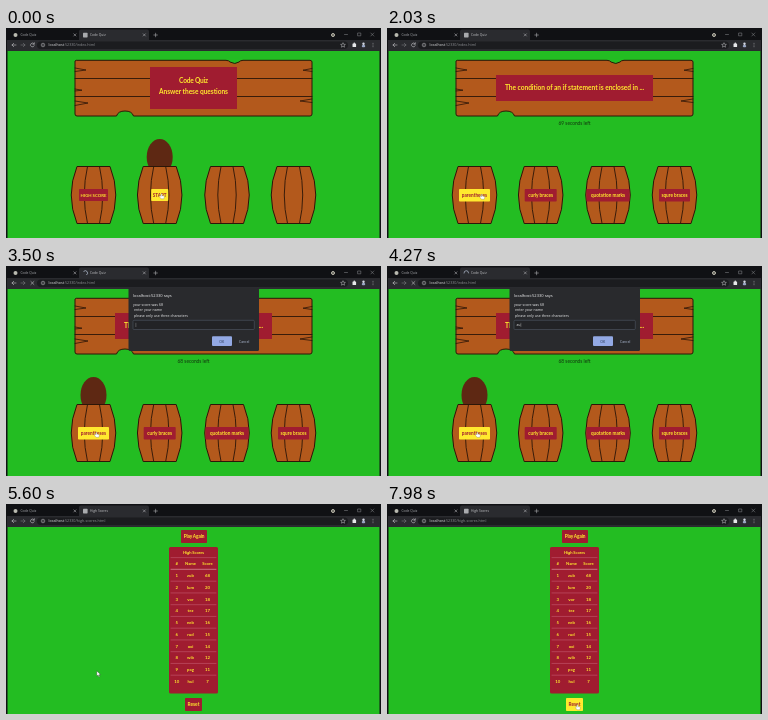
Animation, 375 px wide and 210 px high, one loop 8 s. Source, as an HTML page:

```html
<!DOCTYPE html>
<html lang="en">
<head>
<meta charset="utf-8">
<title>Code Quiz</title>
<style>
html, body { margin: 0; width: 100%; height: 100%; overflow: hidden; background: #101114; }
svg { display: block; width: 100vw; height: 100vh; }
text { font-family: "Open Sans", sans-serif; }
.game { font-family: Lato, sans-serif; font-weight: 700; }
</style>
</head>
<body>
<svg id="stage" viewBox="0 0 375 210"></svg>
<script>
const LOOP = 8000;
const GREEN = '#23bd22', WOOD = '#b3591c', RED = '#a01c30', YELLOW = '#ffe92e';
const INK = '#2c1608', PALE = '#c4c5c8', DIM = '#8d8f93';
const stage = document.getElementById('stage');

function el(parent, tag, attrs = {}, content) {
  const node = document.createElementNS('http://www.w3.org/2000/svg', tag);
  set(node, attrs);
  if (content !== undefined) node.textContent = content;
  parent.appendChild(node);
  return node;
}
function set(node, attrs) {
  for (const key in attrs) node.setAttribute(key, attrs[key]);
}
const group = parent => el(parent, 'g');
const rect = (p, x, y, width, height, fill, rx = 0) =>
  el(p, 'rect', { x, y, width, height, fill, rx });
const circle = (p, cx, cy, r, fill) => el(p, 'circle', { cx, cy, r, fill });
const line = (p, d, stroke = PALE, width = 0.6) =>
  el(p, 'path', { d, stroke, fill: 'none', 'stroke-width': width, 'stroke-linecap': 'round' });
const label = (p, x, y, size, fill, str) =>
  el(p, 'text', { x, y, 'font-size': size, fill }, str);
const gameText = (p, x, y, size, str, fill = YELLOW, spacing = 0) =>
  el(p, 'text', { x, y, 'font-size': size, fill, class: 'game', 'text-anchor': 'middle', 'letter-spacing': spacing }, str);
const show = (node, on) => node.setAttribute('display', on ? 'inline' : 'none');
const progress = (t, a, b) => Math.min(1, Math.max(0, (t - a) / (b - a)));
const ease = k => k * k * (3 - 2 * k);

// Button whose colours swap on hover
function button(p, cx, y, w, h, size, str, spacing = 0) {
  const box = rect(p, cx - w / 2, y, w, h, RED, 0.8);
  const txt = gameText(p, cx, y + h / 2 + size * 0.35, size, str, YELLOW, spacing);
  return hot => {
    set(box, { fill: hot ? YELLOW : RED });
    set(txt, { fill: hot ? RED : YELLOW });
  };
}

function buildPlank(p) {
  el(p, 'path', {
    d: 'M69 33Q70 32 72 32.3H220Q223 32.5 224 34Q229 37 233 34Q234 32.5 237 32.3H304Q306 32.5 306 34V86Q306 88 304 88' +
       'H127.5Q126 83 119 83Q112 83 110.5 88H71Q69 88 69 86Z',
    fill: WOOD, stroke: INK, 'stroke-width': 1, 'stroke-linejoin': 'round'
  });
  line(p, 'M69 50.5H306M69 68.5H306', INK, 0.9);
  // Thin splits along both ends
  line(p, 'M69 40L80 42L69 43.5M69 61L76 62.2L69 63M69 73L82 75L69 77.5' +
          'M306 40.5L297 42.2L306 43.5M306 71L294 73L306 74.5', INK, 0.8);
}

const BARRELS = [87.5, 153.7, 221, 287.5];
function buildBarrel(p, cx) {
  const g = el(p, 'g', { transform: `translate(${cx} 0)` });
  el(g, 'path', {
    d: 'M-16.5 138.5H16.5Q28 167 16.5 195.5H-16.5Q-28 167 -16.5 138.5Z',
    fill: WOOD, stroke: INK, 'stroke-width': 1, 'stroke-linejoin': 'round'
  });
  line(g, 'M-6 138.5Q-12.5 167 -6 195.5M6 138.5Q12.5 167 6 195.5', INK, 0.9);
}

function buildChrome(p) {
  rect(p, 0, 0, 375, 13, '#101114');
  rect(p, 1, 12, 373, 11, '#2a2b2f');
  rect(p, 73, 1.5, 70, 13, '#2a2b2f', 2);
  rect(p, 31, 13.5, 311, 7.5, '#1b1c1f', 3.7);
  circle(p, 9.5, 7, 2, '#b9bab0');
  label(p, 14.5, 8.2, 3.3, '#aeb0b4', 'Code Quiz');
  line(p, 'M67.8 5.8l2.2 2.2m0-2.2l-2.2 2.2M137.2 5.8l2.2 2.2m0-2.2l-2.2 2.2M147.8 7h3.6m-1.8-1.8v3.6', PALE, 0.5);
  set(circle(p, 327, 7, 1.5, '#55544e'), { stroke: '#cfccbd', 'stroke-width': 0.9 });
  line(p, 'M338.5 6.5h3M364.8 5l3 3m0-3l-3 3M352 5h2.8v2.8h-2.8z', DIM, 0.5);
  line(p, 'M10 17H6m1.7-1.7L6 17l1.7 1.7', PALE);
  line(p, 'M15 17h4m-1.7-1.7L19 17l-1.7 1.7', '#77797d');
  el(p, 'path', {
    d: 'M337 14.7l.7 1.6 1.7.1-1.3 1.1.4 1.7-1.5-.9-1.5.9.4-1.7-1.3-1.1 1.7-.1z',
    fill: 'none', stroke: PALE, 'stroke-width': 0.5
  });
  rect(p, 346.5, 15.4, 3.6, 3.6, '#e6e7e9', 0.6);
  circle(p, 348.3, 15.2, 0.8, '#e6e7e9');
  circle(p, 357.5, 15.8, 1.2, '#d3d7e2');
  rect(p, 355.8, 17, 3.4, 2.3, '#9aa6c4', 1);
  for (const y of [15.2, 17, 18.8]) circle(p, 367, y, 0.45, PALE);
  set(circle(p, 37, 17, 1.8, 'none'), { stroke: PALE, 'stroke-width': 0.5 });
  line(p, 'M37 16.9v.9M37 16v.1', PALE, 0.5);
}

// Game page
rect(stage, 1.5, 22, 372, 188, GREEN);
const game = group(stage);
buildPlank(game);
const ape = el(game, 'ellipse', { cy: 129, rx: 13, ry: 18, fill: '#5e2813' });
BARRELS.forEach(cx => buildBarrel(game, cx));

const intro = group(game);
rect(intro, 144, 39, 87, 42, RED);
gameText(intro, 187.5, 55.2, 6.6, 'Code Quiz', YELLOW, -0.2);
gameText(intro, 187.5, 66, 6.6, 'Answer these questions', YELLOW, -0.05);
button(intro, BARRELS[0], 161, 29, 12, 4.3, 'HIGH SCORE');
button(intro, BARRELS[1], 161, 17, 12, 4.6, 'START')(true);

const quiz = group(game);
rect(quiz, 109, 47, 157, 26, RED);
gameText(quiz, 187.5, 62.3, 6.65, 'The condition of an if statement is enclosed in ...', YELLOW, -0.05);
const clock = el(quiz, 'text', { x: 187.5, y: 96.8, 'font-size': 4.8, fill: '#12300f', 'text-anchor': 'middle' });
clock.style.fontFamily = 'Lato, sans-serif';
const answers = [['parentheses', 31], ['curly braces', 32], ['quotation marks', 43], ['squre braces', 31]]
  .map(([str, w], i) => button(quiz, BARRELS[i], 161, w, 12.5, 4.7, str));

// High score page
const NAME = 'zub';
const SCORES = [[NAME, 68], ['lum', 20], ['vor', 18], ['tez', 17], ['neb', 16],
  ['rud', 15], ['oxi', 14], ['wib', 12], ['pag', 11], ['hul', 7]];
const board = group(stage);
button(board, 188, 26, 26, 13, 4.8, 'Play Again', -0.15);
rect(board, 163, 43, 49, 146.5, RED, 1.5);
gameText(board, 187.5, 50, 4.1, 'High Scores', YELLOW, -0.05);
const COLS = [170.8, 184.5, 201.5];
function row(y, cells, size) {
  cells.forEach((c, i) => gameText(board, COLS[i], y, size, c));
}
line(board, 'M165 53.6H210', '#c9657a', 0.5);
row(60.8, ['#', 'Name', 'Score'], 4.2);
line(board, 'M165 65.3H210', '#d98795', 0.8);
SCORES.forEach(([name, score], i) => {
  const y = 73 + i * 11.75;
  row(y, [i + 1, name, score], 4.3);
  if (i < 9) line(board, `M165 ${y + 4.2}H210`, '#c9657a', 0.5);
});
const reset = button(board, 187.5, 194, 17, 13, 4.8, 'Reset');

// Browser frame
buildChrome(stage);
const reload = line(stage, 'M28 15.9a1.9 1.9 0 1 0 .2 1.8M28.3 14.7v1.5h-1.5', PALE);
const stop = line(stage, 'M24.9 15.5l3 3m0-3l-3 3', PALE);
const icon = rect(stage, 77, 4.8, 4.6, 4.6, '#a9abae', 0.6);
const spinner = line(stage, 'M79.3 4.7a2.3 2.3 0 0 1 0 4.6', '#b4bfd2', 0.7);
const tabTitle = label(stage, 84, 8.2, 3.3, PALE, '');
const url = label(stage, 42.5, 18.3, 3.7, '#e2e3e5');
el(url, 'tspan', {}, 'localhost');
const urlTail = el(url, 'tspan', { fill: DIM });

// Prompt
const prompt = group(stage);
rect(prompt, 122.5, 22, 130.5, 63, '#292a2d', 1.5);
label(prompt, 127, 31.3, 4.05, '#f4f5f6', 'localhost:52330 says');
['your score was 68', 'enter your name', 'please only use three characters'].forEach((str, i) =>
  label(prompt, i ? 128 : 127, 39.6 + i * 5.5, 3.6, '#eeeff0', str));
set(rect(prompt, 127, 54.3, 121.3, 9.2, '#222326', 1), { stroke: '#56606f', 'stroke-width': 0.5 });
const typed = label(prompt, 129.5, 60.3, 3.6, '#f0f1f2', '');
const caret = rect(prompt, 0, 56.8, 0.3, 4.2, '#c8c8c8');
rect(prompt, 206, 70.3, 20, 9.7, '#93a9e4', 1);
label(prompt, 213.3, 76.5, 3.5, '#20304c', 'OK');
label(prompt, 233, 76.5, 3.4, '#b4c2dc', 'Cancel');

// Pointers share their hot spot at 0,0
const cursor = group(stage);
const hand = el(cursor, 'path', {
  d: 'M-.5 0Q0-.6.5 0V1.6L2.4 2Q3 2.3 2.8 3L2.3 4.8H-.5L-1.9 2.8Q-1.6 0-.5 2.4Z',
  fill: '#fff', stroke: '#666', 'stroke-width': 0.3
});
const arrow = el(cursor, 'path', {
  d: 'M0 0V5.2L1.3 4.1L2.2 6L3 5.6L2.1 3.8L3.7 3.7Z',
  fill: '#fff', stroke: '#333', 'stroke-width': 0.35
});

const QUIZ_AT = 560, CLICK_AT = 2380, PROMPT_AT = 2740, SCORES_AT = 5460;
const KEYS = [3990, 4200, 4620];
const PATH = [[0, 155.5, 166], [1400, 155.5, 166], [2150, 90.5, 166.5], [SCORES_AT, 90.5, 166.5],
  [5950, 92, 168.5], [7210, 92, 168.5], [7800, 190.5, 201]];

function pointerAt(t) {
  let i = 0;
  while (i < PATH.length - 2 && t >= PATH[i + 1][0]) i++;
  const [a, x0, y0] = PATH[i], [b, x1, y1] = PATH[i + 1];
  const k = ease(progress(t, a, b));
  return [x0 + (x1 - x0) * k, y0 + (y1 - y0) * k];
}

function draw(t) {
  const inQuiz = t >= QUIZ_AT, inScores = t >= SCORES_AT;
  const [x, y] = pointerAt(t);
  show(game, !inScores);
  show(board, inScores);
  show(intro, !inQuiz);
  show(quiz, inQuiz);

  show(ape, !inQuiz || t >= CLICK_AT);
  const rise = inQuiz ? ease(progress(t, CLICK_AT, 2700)) : 1;
  set(ape, { cx: inQuiz ? BARRELS[0] : BARRELS[1], cy: 129 + 34 * (1 - rise) });

  const overAnswer = i => Math.abs(x - BARRELS[i]) < 16;
  answers.forEach((paint, i) => paint(overAnswer(i)));
  clock.textContent = t < 1300 ? 'timer: 70' : `${t < 1560 ? 70 : t < 2380 ? 69 : 68} seconds left`;

  const overReset = inScores && Math.abs(x - 187.5) < 8.5 && y > 194;
  reset(overReset);
  const clickable = inScores ? overReset : !inQuiz || answers.some((_, i) => overAnswer(i));
  show(hand, clickable);
  show(arrow, !clickable);
  set(cursor, { transform: `translate(${x} ${y})` });

  const loading = t >= PROMPT_AT && !inScores;
  show(reload, !loading);
  show(stop, loading);
  show(icon, !loading);
  show(spinner, loading);
  set(spinner, { transform: `rotate(${t * 0.4} 79.3 7)` });
  tabTitle.textContent = inScores ? 'High Scores' : 'Code Quiz';
  urlTail.textContent = ':52330/' + (inScores ? 'high-scores.html' : 'index.html');

  // The prompt fades in while sliding down
  const open = progress(t, PROMPT_AT, PROMPT_AT + 180);
  show(prompt, loading);
  set(prompt, { opacity: open, transform: `translate(0 ${-7 * (1 - open)})` });
  const count = KEYS.filter(k => t >= k).length;
  typed.textContent = NAME.slice(0, count);
  set(caret, { x: 129.8 + count * 2 });
  show(caret, t % 1060 < 530);
}

function tick(now) {
  draw(now % LOOP);
  requestAnimationFrame(tick);
}
draw(0);
requestAnimationFrame(tick);
</script>
</body>
</html>
```
